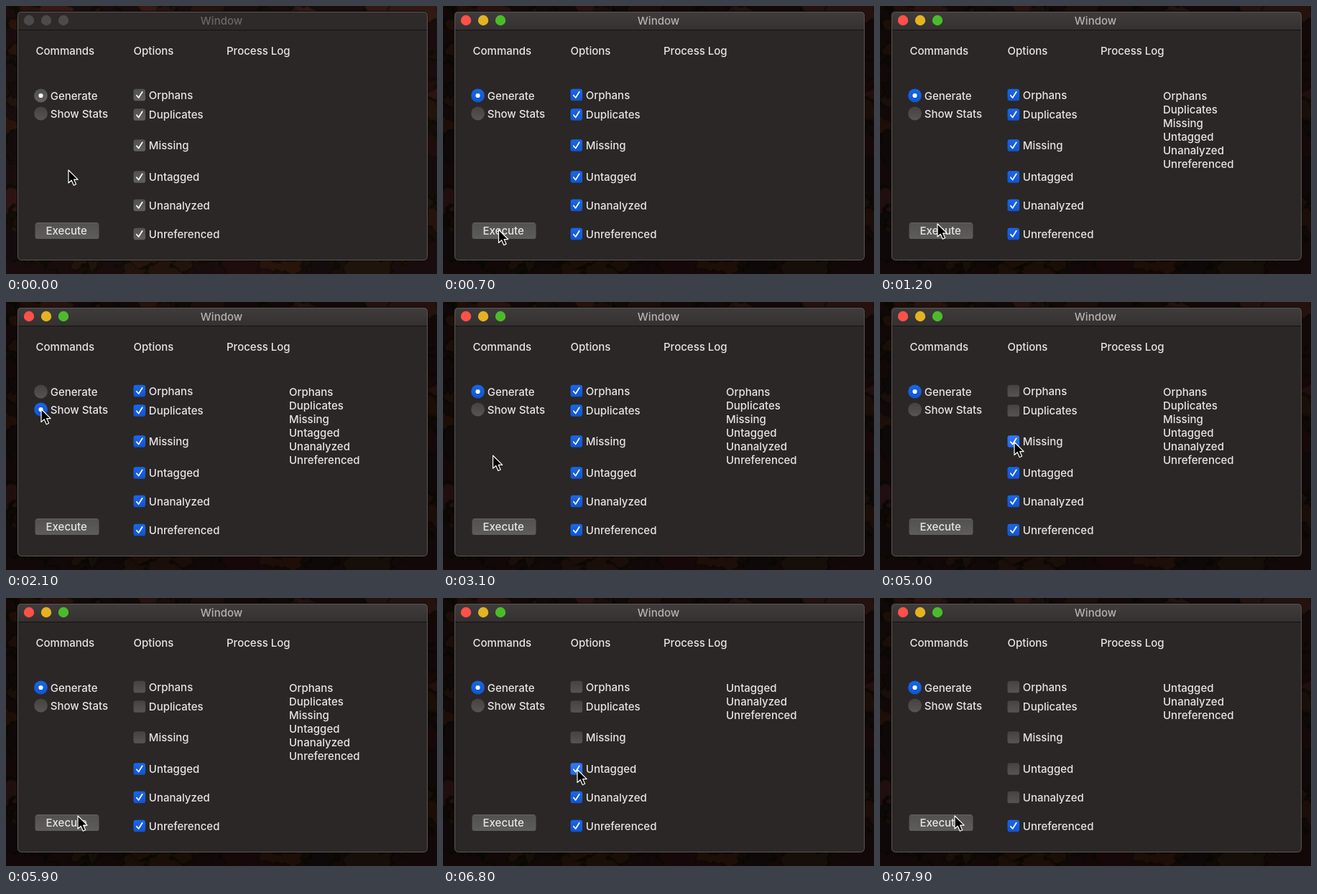
Write an HTML page that moves like this. It is 600x374 px and loops after 8 s.

```html
<!DOCTYPE html>
<html lang="en">
<head>
<meta charset="utf-8">
<title>Window</title>
<style>
  html, body { margin: 0; width: 100%; height: 100%; overflow: hidden; background: #120b09; }
  svg { display: block; width: 100vw; height: 100vh; }
  text { font: 500 15px Inter, Roboto, sans-serif; fill: #e6e4e3; white-space: pre; }
</style>
</head>
<body>
<svg viewBox="0 0 600 374">
  <defs>
    <linearGradient id="grey" x2="0" y2="1"><stop stop-color="#454241"/><stop offset="1" stop-color="#575453"/></linearGradient>
    <linearGradient id="greyOn" x2="0" y2="1"><stop stop-color="#525050"/><stop offset="1" stop-color="#62605f"/></linearGradient>
    <linearGradient id="blue" x2="0" y2="1"><stop stop-color="#1967e8"/><stop offset="1" stop-color="#1254d2"/></linearGradient>
    <linearGradient id="pressed" x2="0" y2="1"><stop stop-color="#3278f6"/><stop offset="1" stop-color="#2268ec"/></linearGradient>
    <linearGradient id="button" x2="0" y2="1"><stop stop-color="#535150"/><stop offset="1" stop-color="#5f5d5c"/></linearGradient>
    <linearGradient id="bar" x2="0" y2="1"><stop stop-color="#3f3c3b"/><stop offset="1" stop-color="#343130"/></linearGradient>
    <filter id="craggy" x="0" y="0" width="1" height="1">
      <feTurbulence type="fractalNoise" baseFrequency=".06" numOctaves="3" seed="4"/>
      <feDisplacementMap in="SourceGraphic" scale="24" xChannelSelector="R" yChannelSelector="G"/>
      <feGaussianBlur stdDeviation=".8"/>
    </filter>
  </defs>
  <g id="rocks" filter="url(#craggy)"></g>
  <rect id="shade" width="600" height="374"/>
  <rect x="15.5" y="7.5" width="571.5" height="347.5" rx="5.5" fill="#2a2726" stroke="#100c0b"/>
  <path id="titleBar" d="M16 33V13a5 5 0 0 1 5-5H582a5 5 0 0 1 5 5V33Z"/>
  <path d="M16 33.5H587" stroke="#151312"/>
  <rect x="16.5" y="8.5" width="570" height="346" rx="5" fill="none" stroke="#5a5655"/>
  <g id="lights"></g>
  <text id="title" x="300" y="26" text-anchor="middle">Window</text>
  <text x="41.5" y="68">Commands</text>
  <text x="177.5" y="68">Options</text>
  <text x="307" y="68">Process Log</text>
  <g id="controls"></g>
  <rect x="40.5" y="302.5" width="89" height="22.5" rx="3" fill="url(#button)"/>
  <path d="M43 302.8H127" stroke="#767473" stroke-width=".8"/>
  <text x="55.5" y="319">Execute</text>
  <g id="log"></g>
  <path id="cursor" d="M0 0V18L4.2 14.2L7.3 21.2L10.6 19.8L7.6 13.1H13.2Z" stroke="#fff" stroke-width="1.2" stroke-linejoin="round"/>
</svg>
<script>
const LOOP = 8000, STEP = 100, CLICK = 200;
const $ = id => document.getElementById(id);
const all = selector => [...document.querySelectorAll(selector)];
const show = (node, visible) => node.style.display = visible ? '' : 'none';
const paint = (node, color) => node.setAttribute('fill', color);

const radios = [{ label: 'Generate', y: 125 }, { label: 'Show Stats', y: 150 }];
const options = [
  { label: 'Orphans', y: 124 }, { label: 'Duplicates', y: 151.5 }, { label: 'Missing', y: 194.5 },
  { label: 'Untagged', y: 238.5 }, { label: 'Unanalyzed', y: 278 }, { label: 'Unreferenced', y: 318 }
];
const lightColors = ['#ff5148', '#e5b321', '#4cbb2b'];

// Effects of a click on the window state
const activate = state => state.active = true;
const run = state => state.log = options.filter((_, i) => state.checked[i]).map(o => o.label);
const select = i => state => state.selected = i;
const uncheck = i => state => state.checked[i] = false;

// Pointer moves; the effect lands one click after arrival
const move = (start, duration, x, y, effect) => ({ start, end: start + duration, x, y, effect });
const toExecute = (start, duration, x, effect) => move(start, duration, x, 304, effect);
const toRadio = (start, duration, i) => move(start, duration, 49, radios[i].y - .5, select(i));
const toOption = (start, duration, i) =>
  ({ ...move(start, duration, 187, options[i].y + 1, uncheck(i)), option: i });

const REST = { x: 87, y: 229 };
const moves = [
  toExecute(0, 200, 77),
  move(300, 200, 77, 314, activate),
  toExecute(600, 400, 80, run),
  toRadio(1500, 400, 1),
  toRadio(2200, 300, 0),
  toExecute(2900, 400, 90, run),
  toOption(3600, 500, 0),
  toOption(4300, 200, 1),
  toOption(4700, 200, 2),
  toExecute(5100, 400, 100),
  toExecute(6000, 100, 100, run),
  toOption(6400, 400, 3),
  toOption(7000, 200, 4),
  toExecute(7400, 400, 104)
];

function stateAt(t) {
  const state = { ...REST, active: false, selected: 0, checked: options.map(() => true), log: [] };
  for (const { start, end, x, y, effect, option } of moves) {
    if (t < start) break;
    const p = Math.min(1, (t - start) / (end - start)), ease = p * p * (3 - 2 * p);
    state.x += (x - state.x) * ease;
    state.y += (y - state.y) * ease;
    state.pressed = t >= end && t < end + CLICK ? option : undefined;
    if (effect && t >= end + CLICK) effect(state);
  }
  return state;
}

let seed = 11;
const random = () => (seed = seed * 16807 % 2147483647) / 2147483647;

function rock() {
  const cx = random() * 600, cy = random() * 374, size = 14 + random() * 28, tilt = random() * 6;
  const points = Array.from({ length: 7 }, (_, i) => {
    const angle = tilt + i * Math.PI * 2 / 7, r = size * (.7 + random() * .4);
    return [cx + r * Math.cos(angle), cy + r * Math.sin(angle) * .8];
  });
  const light = 6 + random() * 11 * (1 - cy / 900);
  return `<polygon points="${points.join(' ')}" fill="hsl(13 46% ${light}%)" stroke="#100806" stroke-width="3"/>`;
}

$('rocks').innerHTML = '<rect x="-30" y="-30" width="660" height="434" fill="#1a0e0b"/>' +
  Array.from({ length: 260 }, rock).join('');
$('lights').innerHTML = lightColors.map((_, i) => `<circle cx="${32 + i * 24}" cy="20" r="7.2"/>`).join('');
$('controls').innerHTML =
  radios.map(({ label, y }) => `<g transform="translate(48.5 ${y})">
    <circle class="radio" r="9.4"/><circle class="dot" r="3.1" fill="#fff"/>
    <text x="13.2" y="5.8">${label}</text></g>`).join('') +
  options.map(({ label, y }) => `<g transform="translate(185.8 ${y})">
    <rect class="box" x="-8.3" y="-8.3" width="16.6" height="16.6" rx="3.4"/>
    <path class="tick" d="M-4 .7L-1.2 4L4 -4.2" fill="none" stroke="#fff" stroke-width="1.7" stroke-linecap="round" stroke-linejoin="round"/>
    <text x="13" y="5.8">${label}</text></g>`).join('');
$('log').innerHTML = options.map((_, i) => `<text x="394" y="${131 + i * 19}"></text>`).join('');

const lights = all('#lights circle'), rings = all('.radio'), dots = all('.dot');
const boxes = all('.box'), ticks = all('.tick'), logLines = all('#log text');

function render(t) {
  const { x, y, active, selected, checked, pressed, log } = stateAt(t);
  const onFill = active ? 'url(#blue)' : 'url(#greyOn)';
  $('shade').setAttribute('opacity', active ? .35 : .1);
  paint($('titleBar'), active ? 'url(#bar)' : '#2d2a29');
  $('title').style.fill = active ? '#b5b2b1' : '#6b6766';
  lights.forEach((light, i) => paint(light, active ? lightColors[i] : '#4e4a49'));
  rings.forEach((ring, i) => paint(ring, i === selected ? onFill : 'url(#grey)'));
  dots.forEach((dot, i) => show(dot, i === selected));
  boxes.forEach((box, i) => paint(box, i === pressed ? 'url(#pressed)' : checked[i] ? onFill : 'url(#grey)'));
  ticks.forEach((tick, i) => show(tick, checked[i]));
  logLines.forEach((line, i) => line.textContent = log[i] || '');
  $('cursor').setAttribute('transform', `translate(${x} ${y})`);
}

const begin = performance.now();
function frame() {
  const t = (performance.now() - begin) % LOOP;
  render(Math.floor(t / STEP) * STEP);
  requestAnimationFrame(frame);
}
frame();
</script>
</body>
</html>
```
